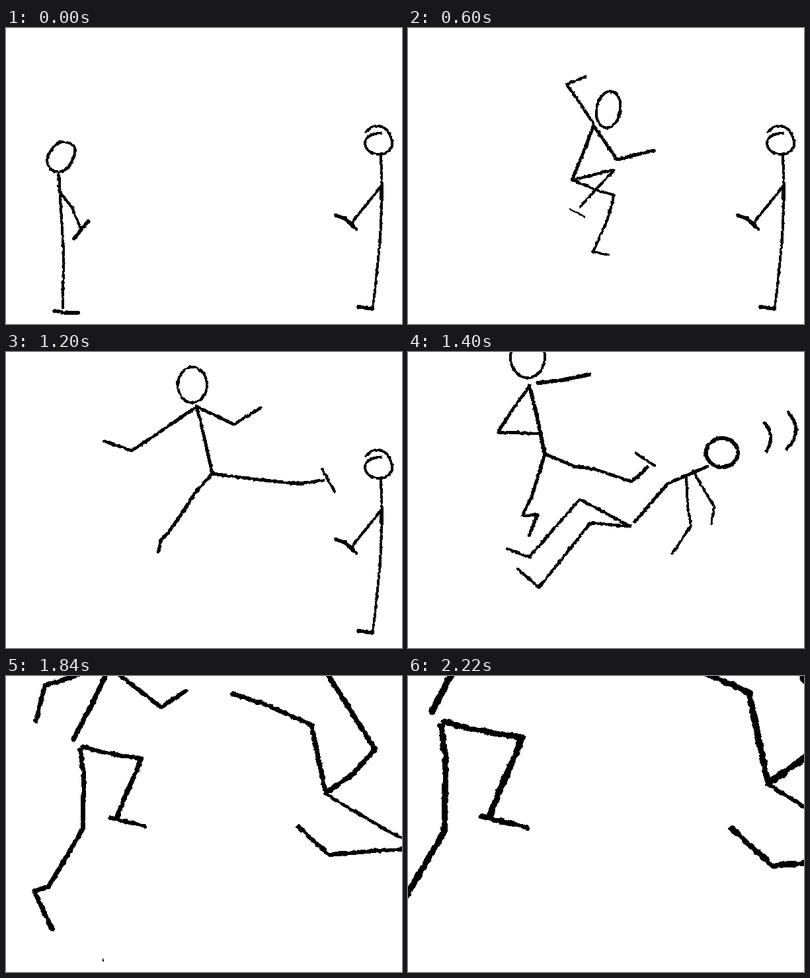
An HTML page for the animation above (2340 ms loop, 599 px wide and 450 px high).

```html
<!DOCTYPE html>
<html lang="en">
<head>
<meta charset="utf-8">
<title>Stick figure kick</title>
<style>
html, body { margin: 0; width: 100%; height: 100%; overflow: hidden; background: #fff; }
svg { display: block; width: 599px; height: 450px; }
g { fill: none; stroke: #000; stroke-linecap: round; stroke-linejoin: round; }
</style>
</head>
<body>
<svg viewBox="0 0 599 450">
  <filter id="rough" filterUnits="userSpaceOnUse" x="0" y="0" width="599" height="450" color-interpolation-filters="sRGB">
    <feTurbulence type="fractalNoise" baseFrequency=".2" seed="4"/>
    <feDisplacementMap in="SourceGraphic" scale="4" xChannelSelector="R" yChannelSelector="G"/>
    <feComponentTransfer><feFuncA type="discrete" tableValues="0 1"/></feComponentTransfer>
  </filter>
  <g id="scene" filter="url(#rough)"></g>
</svg>
<script>
const LOOP = 2340;
const ticks = [...Array(17).keys()].map(i => i * 100).concat(1720, 1840, 1970, 2090, 2220);
const scene = document.getElementById('scene');

// Pose: head (width cx cy rx ry tilt), then limbs (width x,y x,y ...).
const pose = text => text.split('/').map(limb => limb.trim().split(/[ ,]+/).map(Number));

// Limbs: torso, back arm, front arm, back leg, front leg, front foot
const attacker = [
  [100, pose('4 112 195 20 25 10 / 5 100,222 90,255 82,295 / 4 98,228 70,240 45,255 30,280 / 4 100,228 125,262 155,245 / 4 82,295 72,325 65,345 40,360 15,375 3,385 / 4 82,295 105,310 125,322 130,345 128,370 125,405 / 4 122,408 145,410')],
  [300, pose('4 190 165 20 26 10 / 5 176,193 164,230 150,270 / 4 176,196 195,235 212,250 235,235 / 4 176,198 145,225 120,245 / 4 150,270 175,285 200,295 200,330 198,385 218,392 / 4 150,270 145,300 140,330 115,345 95,358 70,375 / 4 70,362 66,388')],
  [600, pose('4 303 124 18 28 10 / 5 281,148 265,190 248,231 / 4.5 281,146 262,117 240,86 268,74 / 5 282,150 316,200 372,186 / 4 248,231 290,248 312,254 302,290 280,340 303,345 / 4 248,231 270,226 296,219 312,216 285,245 260,272 / 3 245,275 267,287')],
  [1000, pose('4 313 59 20 26 -14 / 5 320,85 324,140 317,177 / 4.5 312,83 275,115 237,151 211,121 / 5 322,85 379,37 336,-1 / 6.5 317,177 308,205 300,235 288,270 281,280 281,313 / 5 317,177 342,173 365,158 402,148 380,178 360,208 / 4 357,208 379,208')],
  [1200, pose('4 282 50 22 27 0 / 5 288,82 300,130 312,185 / 5 284,86 235,120 190,150 147,135 / 5 290,84 345,110 385,85 / 5 312,185 285,215 270,240 245,275 235,285 230,305 / 5 312,185 350,190 390,195 440,200 460,198 480,195 / 4 478,178 497,212')],
  [1400, pose('4 181 8 26 31 0 / 6 184,52 195,98 207,155 / 5 184,52 160,85 136,122 202,124 / 6 196,47 232,43 275,34 / 5 207,155 197,188 187,220 173,249 196,247 183,279 / 5 207,155 252,174 282,178 338,197 350,187 362,175 / 4 345,154 373,173')],
  [1600, pose('5 214 6 22 28 0 / 6 188,40 169,80 146,124 / 5.5 190,39 165,43 112,61 102,102 / 5 196,45 249,86 278,67 / 5.5 154,137 158,165 157,230 117,298 100,304 121,349 / 5.5 157,133 175,138 200,143 226,147 212,180 197,216 / 5 190,217 230,227')]
];

// Limbs: torso, two arms, two legs
const victim = [
  [1300, pose('5 520 162 23 22 0 / 5 508,188 480,225 440,285 / 4 500,200 480,240 470,262 448,292 / 4 504,196 508,245 495,275 / 5 440,285 395,280 390,365 355,375 / 5 440,285 410,300 420,390 388,395')],
  [1400, pose('6 475 153 24 22 0 / 5 453,174 393,200 343,258 / 4 421,188 423,235 428,264 400,306 / 4 431,181 463,235 459,261 / 4.5 336,265 260,224 183,312 150,299 / 4.5 336,265 276,260 198,358 166,330')],
  [1600, pose('5 598 263 40 31 0 / 4 556,254 510,229 443,189 / 5 541,254 500,256 447,261 411,228 / 5 559,250 560,215 559,153 / 5.5 443,188 426,107 372,83 333,70 / 6 443,188 475,165 501,136 442,42')]
];

const path = (d, width) => `<path d="${d}" stroke-width="${width}"/>`;

const waiting = path('M82,173Q66,182 62,201Q64,218 80,219Q95,216 99,204Q106,190 104,182Q98,172 82,173M80,219L81,245 84,290 87,340 86,425M80,240L84,253 100,273 113,305', 4)
  + path('M103,320L124,294M73,430L90,433 109,433', 5.5);

const standing = path('M544,158Q556,145 572,151Q586,165 584,180Q577,193 563,192Q545,190 543,176Q545,160 567,160M567,192L569,250 566,320 560,380 555,427M568,240L526,292 524,299M567,240V262', 4)
  + path('M533,424L554,427M499,285L514,290 529,306', 5.5);

const impact = path('M540,108Q556,130 542,151M575,92Q600,120 573,147', 5);
const speck = path('M181,385h.1', 2);

function poseAt(keys, t) {
  const last = keys.length - 1;
  const i = Math.min(keys.findLastIndex(key => key[0] <= t), last);
  if (i === last) return keys[i][1];
  const [[t0, a], [t1, b]] = keys.slice(i, i + 2);
  const u = (t - t0) / (t1 - t0);
  return a.map((limb, j) => limb.map((v, k) => v + (b[j][k] - v) * u));
}

function figure(keys, t) {
  const [[w, cx, cy, rx, ry, tilt], ...limbs] = poseAt(keys, t);
  return `<ellipse cx="${cx}" cy="${cy}" rx="${rx}" ry="${ry}" stroke-width="${w}" transform="rotate(${tilt} ${cx} ${cy})"/>`
    + limbs.map(([width, ...points]) => path('M' + points.join(' '), width)).join('');
}

function draw(step) {
  const t = ticks[step];
  const zoom = 1 + Math.max(0, step - 16) * .1425;
  scene.setAttribute('transform', `translate(300 222) scale(${zoom}) translate(-300 -222)`);
  scene.innerHTML = (t < 100 ? waiting : figure(attacker, t))
    + (t < 1300 ? standing : figure(victim, t))
    + (t === 1400 ? impact : '')
    + (t >= 1600 ? speck : '');
}

let shown = -1;
function frame() {
  const t = performance.now() % LOOP;
  const step = ticks.findLastIndex(tick => tick <= t);
  if (step !== shown) draw(shown = step);
  requestAnimationFrame(frame);
}
frame();
</script>
</body>
</html>
```
